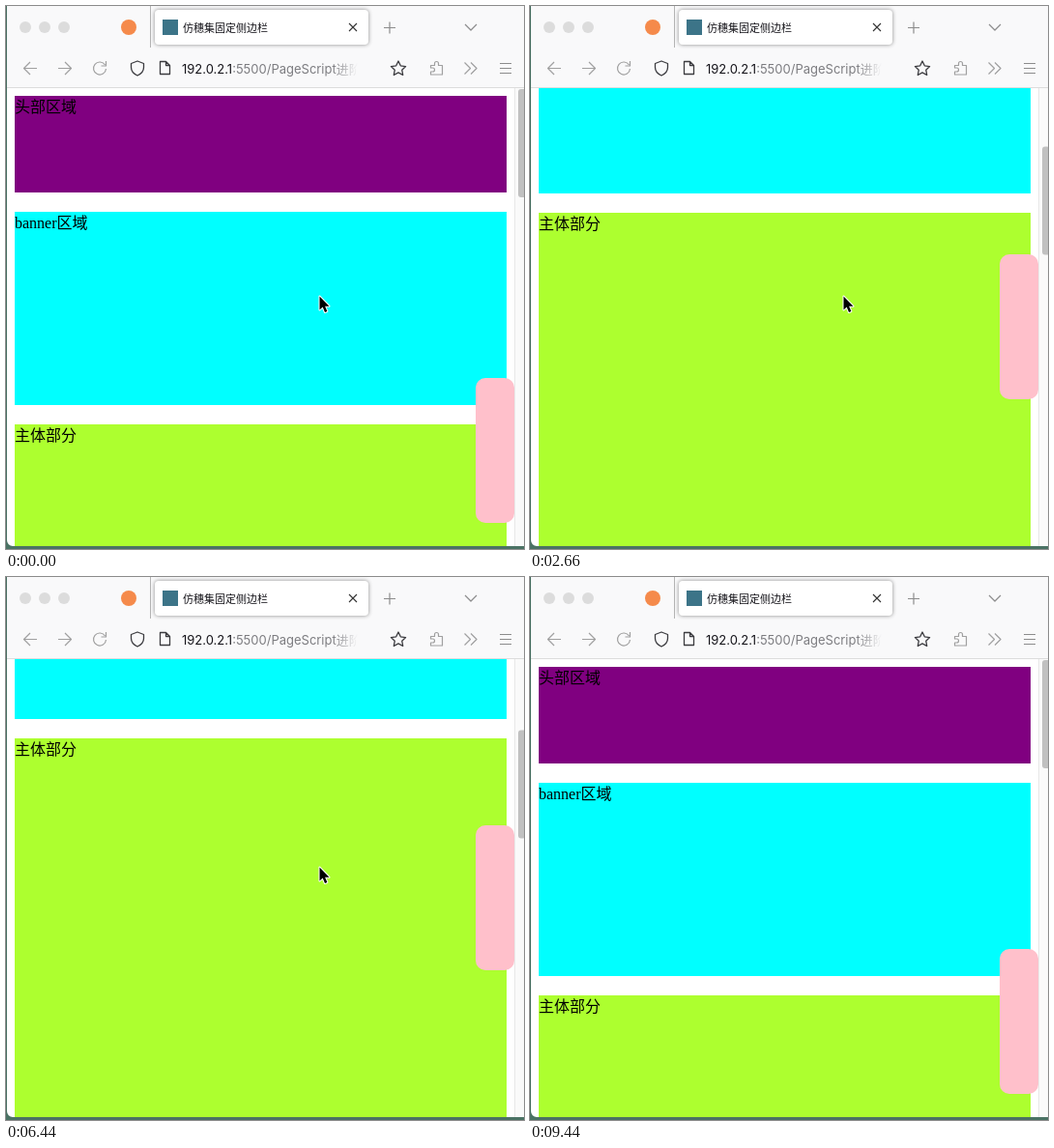
An HTML page with a canvas for the animation above (9740 ms loop, 536 px wide and 562 px high).

```html
<!DOCTYPE html>
<html lang="zh">
<head>
<meta charset="utf-8">
<title>固定侧边栏</title>
<style>
  html, body { margin: 0; width: 100%; height: 100%; overflow: hidden; background: #fff; }
  canvas { display: block; }
</style>
</head>
<body>
<canvas id="stage" width="536" height="562"></canvas>
<script>
const ctx = document.getElementById('stage').getContext('2d');
const LOOP = 9740;
const VIEW = { top: 85, bottom: 559 };
const SANS = 'Inter, "Noto Sans CJK SC", "Noto Sans CJK", sans-serif';
const SERIF = '"Liberation Serif", "Noto Sans CJK SC", "Noto Sans CJK", serif';

// Wheel gestures: first change, last change, steps, lines scrolled to, first fraction
const LINE = 19;
const WHEEL = [
  [770, 950, 4, 5], [1130, 1300, 4, 6], [1600, 1780, 4, 8],
  [2140, 2250, 3, 10, 0.316], [2550, 2720, 4, 13], [3020, 3130, 3, 15],
  [3360, 3480, 3, 17, 0.158], [3780, 3900, 3, 19], [4320, 4550, 5, 21],
  [4970, 5140, 4, 23], [5500, 5680, 4, 24], [5860, 6090, 5, 20],
  [6270, 6440, 4, 14], [6860, 6970, 3, 11], [7260, 7440, 4, 5],
  [7790, 7970, 4, 0]
];

const smooth = x => x * x * (3 - 2 * x);

// Index of the current discrete step, -1 before the first
function stepAt(t, from, to, n) {
  if (t < from) return -1;
  if (t >= to) return n - 1;
  return Math.floor((t - from) / (to - from) * (n - 1));
}

function scrollAt(t) {
  let pos = 0;
  for (const [from, to, n, lines, first] of WHEEL) {
    const i = stepAt(t, from, to, n);
    if (i < 0) break;
    const p = i === 0 && first ? first : smooth((i + 1) / n);
    pos += (lines * LINE - pos) * p;
  }
  return Math.round(pos);
}

function rect(color, x, y, w, h) {
  ctx.fillStyle = color;
  ctx.fillRect(x, y, w, h);
}

function round(color, x, y, w, h, r) {
  ctx.fillStyle = color;
  ctx.beginPath();
  ctx.roundRect(x, y, w, h, r);
  ctx.fill();
}

function disc(color, x, y, r) {
  ctx.fillStyle = color;
  ctx.beginPath();
  ctx.arc(x, y, r, 0, Math.PI * 2);
  ctx.fill();
}

function stroke(color, d, width = 1.2) {
  ctx.strokeStyle = color;
  ctx.lineWidth = width;
  ctx.stroke(new Path2D(d));
}

function text(str, x, y, font, color) {
  ctx.font = font;
  ctx.fillStyle = color;
  ctx.fillText(str, x, y);
}

function block(color, label, y, h) {
  rect(color, 9, y, 509, h);
  text(label, 9, y + 17, '16px ' + SERIF, '#000');
}

function drawPage(s) {
  ctx.save();
  ctx.beginPath();
  ctx.rect(0, VIEW.top, 536, VIEW.bottom - VIEW.top);
  ctx.clip();
  rect('#fff', 0, 85, 536, 474);
  block('#800080', '头部区域', 93 - s, 100);
  block('#00ffff', 'banner区域', 213 - s, 200);
  block('#adff2f', '主体部分', 433 - s, 1600);
  rect('#fafafa', 526, 85, 10, 474);
  rect('#e8e8e8', 526, 85, 1, 474);
  round('#c1c1c1', 530, 86 + s * 0.2722, 8, 112, 3);
  round('#ffc0cb', 486, Math.max(385 - s, 257), 40, 150, 10);
  ctx.restore();
}

function drawTabs() {
  for (const x of [20, 40, 60]) disc('#dcdcdc', x, 22, 6);
  disc('#f58a4b', 127, 22, 8);
  rect('#b4b4b4', 149, 0, 1, 43);

  ctx.save();
  ctx.shadowColor = 'rgba(0,0,0,.45)';
  ctx.shadowBlur = 4;
  round('#fff', 154, 4, 221, 36, 4);
  ctx.restore();
  rect('#3c7488', 162, 14, 16, 16);
  text('仿穗集固定侧边栏', 183, 27, '11px ' + SANS, '#15141a');
  stroke('#333', 'M355 18l8 8M363 18l-8 8', 1.1);
  stroke('#8c8c8c', 'M391 22.5h12M397 16.5v12');
  stroke('#8c8c8c', 'M475 19l6 6l6 -6');
}

function drawToolbar() {
  const pale = '#a0a0a0', dark = '#3c3c40';
  stroke(pale, 'M32 64.5H18.5M25 58l-6.5 6.5l6.5 6.5');
  stroke(pale, 'M54 64.5h13.5M61 58l6.5 6.5l-6.5 6.5');
  stroke(pale, 'M102.5 61A6.5 6.5 0 1 0 103.5 65M103.5 57v5h-5');
  stroke(dark, 'M136 57l6.5 2.5v4q0 5.500-6.500 8.500q-6.500-3-6.500-8.500v-4z', 1.3);
  stroke(dark, 'M159.500 57.500h6l4 4v9h-10zM165.500 57.500v4h4', 1.3);

  const font = '13px ' + SANS, host = '192.0.2.1';
  text(host, 182, 70, font, '#15141a');
  const x = 182 + ctx.measureText(host).width;
  const fade = ctx.createLinearGradient(338, 0, 364, 0);
  fade.addColorStop(0, '#7c7c80');
  fade.addColorStop(1, 'rgba(124,124,128,0)');
  ctx.save();
  ctx.beginPath();
  ctx.rect(182, 50, 182, 30);
  ctx.clip();
  text(':5500/PageScript进阶', x, 70, font, fade);
  ctx.restore();

  let star = '';
  for (let i = 0; i < 10; i++) {
    const a = -Math.PI / 2 + i * Math.PI / 5, r = i % 2 ? 3.9 : 8;
    star += (i ? 'L' : 'M') + (406 + r * Math.cos(a)) + ' ' + (65 + r * Math.sin(a));
  }
  ctx.lineJoin = 'round';
  stroke(dark, star + 'Z', 1.3);
  stroke(pale, 'M439.500 61.500h4v-2a2 2 0 0 1 4 0v2h4v9.500h-12v-3h2a2 2 0 0 0 0-4h-2z');
  stroke(pale, 'M474.500 58.500l6 6l-6 6M481 58.500l6 6l-6 6');
  stroke('#8c8c8c', 'M511 59.500h12M511 64.500h12M511 69.500h12', 1);
}

function drawChrome() {
  rect('#f9f9fa', 0, 0, 536, 84);
  rect('#dcdcdc', 0, 84, 536, 1);
  drawTabs();
  drawToolbar();
}

function drawEdges() {
  ctx.fillStyle = '#4a7264';
  ctx.beginPath();
  ctx.rect(0, 0, 536, 562);
  ctx.roundRect(1, -10, 550, 569, [0, 0, 0, 6]);
  ctx.fill('evenodd');
}

function drawCursor(t) {
  const i = stepAt(t, 8980, 9440, 9);
  if (i === 8) return;
  const p = smooth((i + 1) / 9);
  ctx.save();
  ctx.translate(324 + 152 * p, 300 + 262 * p);
  const arrow = new Path2D('M.5 .5V14.500L3.700 11.600L6 17L8.400 16L6.100 10.700H10.500Z');
  ctx.strokeStyle = '#fff';
  ctx.lineWidth = 2;
  ctx.lineJoin = 'round';
  ctx.stroke(arrow);
  ctx.fillStyle = '#000';
  ctx.fill(arrow);
  ctx.restore();
}

function draw(t) {
  drawPage(scrollAt(t));
  drawChrome();
  drawEdges();
  drawCursor(t);
}

const start = performance.now();
function tick() {
  draw((performance.now() - start) % LOOP);
  requestAnimationFrame(tick);
}
tick();
</script>
</body>
</html>
```
